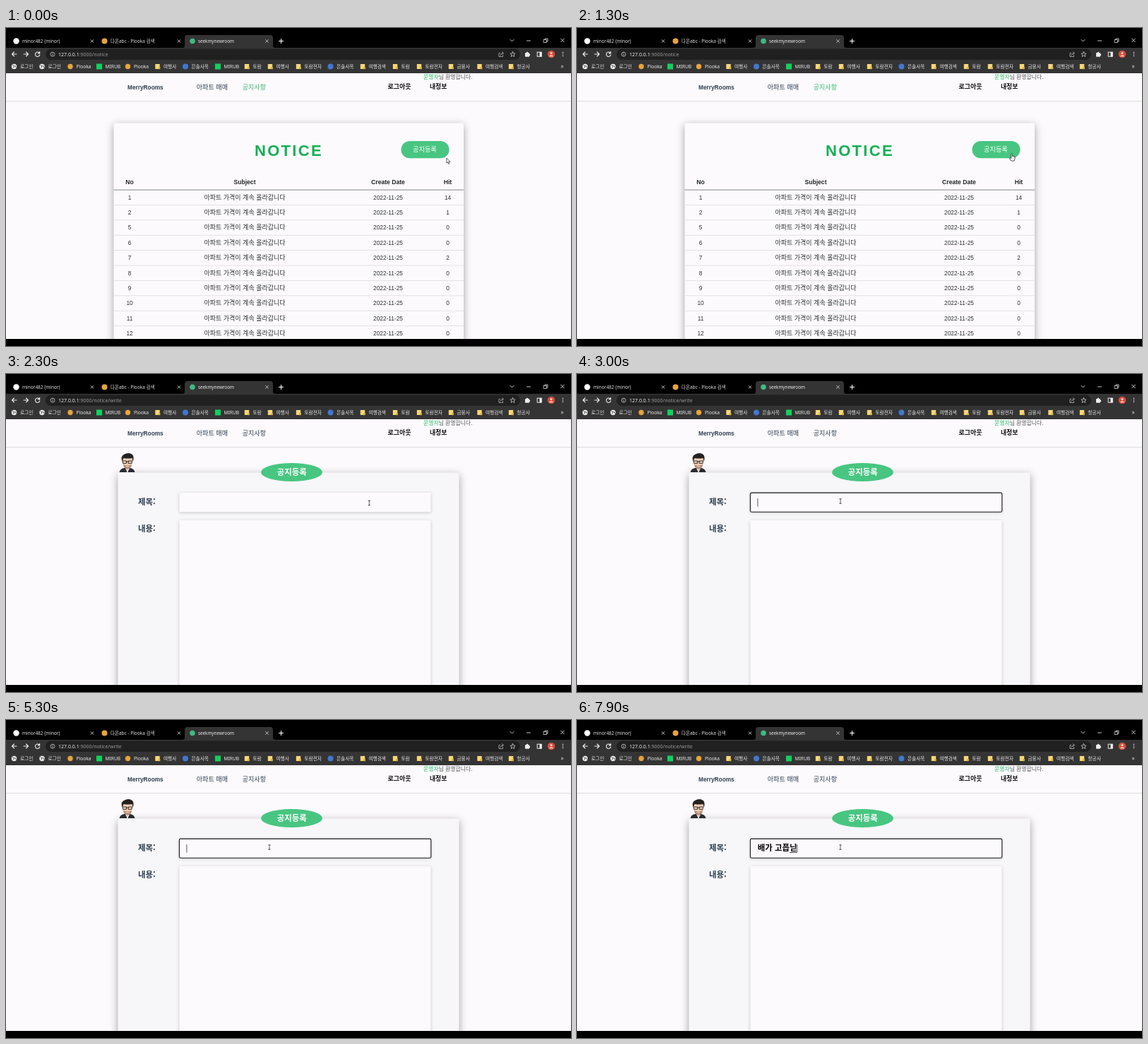
Recreate the animation shown at these times as an HTML page. Size 800 px wide and 450 px high, loop 8000 ms.

```html
<!DOCTYPE html>
<html lang="ko">
<head>
<meta charset="utf-8">
<title>Notice board</title>
<style>
html, body { margin: 0; width: 100%; height: 100%; overflow: hidden; background: #000; }
svg { display: block; width: 100%; height: 100%; }
text { font-family: "Liberation Sans", "Noto Sans CJK KR", "Noto Sans CJK", sans-serif; white-space: pre; }
.ui { font-family: "Noto Sans", "Noto Sans CJK KR", "Noto Sans CJK", sans-serif; }
.ko { font-family: "Noto Sans CJK KR", "Noto Sans CJK", sans-serif; }
.b { font-weight: 700; }
.m { font-weight: 500; }
.mid { text-anchor: middle; }
.card { filter: drop-shadow(0 3px 6px rgba(0,0,0,.36)); }
.field { filter: drop-shadow(0 1px 2px rgba(0,0,0,.2)); }
.line { fill: none; stroke-linecap: round; stroke-linejoin: round; }
</style>
</head>
<body>
<svg id="stage" viewBox="0 0 800 450"></svg>
<script>
const GREEN = '#48c681', INK = '#2c3e50', PAGE = '#fcfafd', BAR = '#343435';

const text = (x, y, size, str, fill, cls = '') =>
  `<text x="${x}" y="${y}" font-size="${size}" fill="${fill}" class="${cls}">${str}</text>`;
const rect = (x, y, w, h, fill, more = '') =>
  `<rect x="${x}" y="${y}" width="${w}" height="${h}" fill="${fill}" ${more}/>`;
const circle = (x, y, r, fill, more = '') =>
  `<circle cx="${x}" cy="${y}" r="${r}" fill="${fill}" ${more}/>`;
const line = (d, stroke = '#ddd', width = 0.9) =>
  `<path class="line" d="${d}" stroke="${stroke}" stroke-width="${width}"/>`;
const cross = (x, y, r) => line(`M${x - r} ${y - r}l${2 * r} ${2 * r}m0 ${-2 * r}l${-2 * r} ${2 * r}`);

const icons = {
  globe: x => circle(x, 54.5, 3.7, '#eee') + line(`M${x - 2} 52.5l2 1.5l-1 2M${x + 1} 53l1.5 2.5`, '#444', 1),
  dot: x => circle(x, 54.5, 3.7, '#e8a33a'),
  square: x => rect(x - 4, 50.5, 8, 8, '#12d05e'),
  ball: x => circle(x, 54.5, 4, '#4377cf'),
  folder: x => `<path d="M${x - 3.2} 51h6.4v7h-6.4z" fill="#f8d775"/><path d="M${x + 1} 55h2.8v3.2h-2.8z" fill="#e3b543"/>`
};
const bookmarks = [
  [11.5, 'globe', '로그인'], [51, 'globe', '로그인'], [91, 'dot', 'Plooka'], [132, 'square', 'MIRUB'],
  [172.5, 'dot', 'Plooka'], [214.5, 'folder', '여행사'], [254, 'ball', '은솔사옥'], [300, 'square', 'MIRUB'],
  [341, 'folder', '토람'], [374, 'folder', '여행사'], [414, 'folder', '토람전자'], [459.5, 'ball', '은솔사옥'],
  [505, 'folder', '여행검색'], [551, 'folder', '토람'], [585, 'folder', '토람전자'], [630, 'folder', '금융사'],
  [670.5, 'folder', '여행검색'], [715, 'folder', '항공사']
];

function browser() {
  const tabs =
    `<path d="M250 28q3 0 3-3V14q0-4 4-4h117q4 0 4 4v11q0 3 3 3z" fill="${BAR}"/>` +
    circle(14.5, 18.5, 4.2, '#fff') + text(23, 21, 6.5, 'minor482 (minor)', '#ddd', 'ui') +
    circle(139.5, 18.5, 4, '#e8a33a') + text(148, 21, 6.5, '다온abc - Plooka 검색', '#ddd', 'ui') +
    circle(264, 18.5, 3.8, '#41b883') + text(272, 21, 6.3, 'seekmynewroom', '#eee', 'ui') +
    cross(122, 18.5, 1.8) + cross(245, 18.5, 1.8) + cross(369.5, 18.5, 1.8) +
    line('M386.5 18.5h6m-3-3v6', '#fff', 1.1) +
    line('M714 16.5l2.5 2.5l2.5-2.5M737.5 18h5') + cross(788, 17.5, 2.4) +
    line('M761.5 16.5h4v4h-4zM763 16.5v-1.5h4v4h-1.5', '#ddd', 0.8);
  const tools =
    rect(56, 29.5, 672, 15.5, '#202021', 'rx="7.7"') +
    line('M15 37H8.5m3-3l-3 3l3 3M25 37h6.5m-3-3l3 3l-3 3', '#eee', 1.1) +
    line('M47 35a3.2 3.2 0 1 0 .8 3M47.7 33.5v2.4h-2.4', '#eee', 1.1) +
    circle(66, 37.2, 3, 'none', 'stroke="#ccc" stroke-width=".8"') + line('M66 37v1.7M66 35.6v.1', '#ccc', 0.8) +
    text(74, 39.8, 7, '127.0.0.1<tspan fill="#9a9a9c">:9000/notice<tspan id="path"></tspan></tspan>', '#eee', 'ui') +
    line('M699.5 35.5H698v5h5.5v-2M700 38.5q.5-3 4-3m-1.5-1.7l1.8 1.7l-1.8 1.7', '#bbb', 0.8) +
    line('M717.5 33.6l1 2.4l2.6.2l-2 1.7l.7 2.6l-2.3-1.4l-2.3 1.4l.7-2.6l-2-1.7l2.6-.2z', '#ccc', 0.8) +
    rect(735, 35, 6, 5.8, '#eee', 'rx=".7"') + circle(738, 35, 1.2, '#eee') + circle(741, 38, 1.2, '#eee') +
    rect(752.2, 34.2, 6, 6, 'none', 'stroke="#eee"') + rect(755.5, 34, 3, 6.5, '#eee') +
    circle(772, 37, 5.3, '#d94b38') + circle(772, 35.6, 1.6, '#f7d4c7') +
    '<path d="M768.7 40.2q3.3-4 6.6 0z" fill="#f7d4c7"/>' +
    [34.5, 37, 39.5].map(y => circle(788.5, y, 0.75, '#eee')).join('');
  const marks = bookmarks.map(([x, icon, label]) =>
    icons[icon](x) + text(x + 8.4, 56.8, 6.7, label, '#e8e8e8', 'ui')).join('');
  return rect(0, 0, 800, 64, '#000') + rect(0, 28, 800, 36, BAR) + tabs + tools + marks +
    text(785.5, 56.5, 8, '»', '#ddd', 'ui');
}

const header = () =>
  text(172, 87, 8.3, 'MerryRooms', INK, 'b') +
  text(269.7, 87, 9.1, '아파트 매매', INK, 'ko m') +
  `<g id="menu">${text(334.8, 87, 9, '공지사항', 'currentColor', 'ko m')}</g>` +
  text(591, 71.6, 7.85, `<tspan fill="#25b864">운영자</tspan>님 환영합니다.`, '#555', 'ko') +
  text(540.5, 85.5, 9, '로그아웃', '#111', 'ko b') +
  text(600, 85.5, 8.8, '내정보', '#111', 'ko b') +
  rect(0, 103.2, 800, 1, '#dadadd');

function noticePage() {
  const columns = [175, 338, 541, 625.5];
  const hits = { 1: 14, 2: 1, 7: 2 };
  const head = ['No', 'Subject', 'Create Date', 'Hit']
    .map((s, i) => text(columns[i], 221, 8.6, s, '#212529', 'b mid')).join('');
  const rows = [1, 2, 5, 6, 7, 8, 9, 10, 11, 12].map((no, i) => {
    const y = 242.5 + 21.4 * i;
    return text(columns[0], y, 8.3, no, '#2b2f33', 'mid') +
      text(columns[1], y, 9, '아파트 가격이 계속 올라갑니다', '#2b2f33', 'ko mid') +
      text(columns[2], y, 8.3, '2022-11-25', '#2b2f33', 'mid') +
      text(columns[3], y, 8.3, hits[no] || 0, '#2b2f33', 'mid') +
      rect(152.5, y + 7.5, 495.5, 0.8, '#dcdde0');
  }).join('');
  return rect(152.5, 134.5, 495.5, 340, PAGE, 'rx="3" class="card"') +
    `<g letter-spacing="2.3">${text(352, 180.5, 22, 'NOTICE', '#14b053', 'b')}</g>` +
    rect(559.5, 160, 68, 24.3, GREEN, 'rx="12.15"') +
    text(576, 175.4, 9.2, '공지등록', '#fff', 'ko') +
    head + rect(152.5, 228.6, 495.5, 1, '#858789') + rows;
}

const avatar = () =>
  '<path d="M160.5 139q1-5 7-6h8q6 1 7 6z" fill="#292b30"/>' +
  '<path d="M169 131h6v3l-3 4l-3-4z" fill="#eec4a9"/>' +
  '<path d="M165 119q7-5 14 0v7q-1 6-7 8q-6-2-7-8z" fill="#f3cdb4"/>' +
  '<path d="M164.3 124q-2-8 2.5-10q7-4 12 0q3 3 .9 10l-1.2-5q-6 1-12 0z" fill="#25211f"/>' +
  '<path d="M166 128q1 6 6 6.500q5-.5 6-6.500q-3 1.500-6 1.500t-6-1.500z" fill="#b08772"/>' +
  line('M165.500 123h5v3.400h-4.500zM173.500 123h5l-.5 3.400h-4.500zM170.500 124h3', '#222', 0.9) +
  line('M170 131h4', '#fff', 0.8) + line('M170.500 135l1.500 4l1.500-4', '#eee', 1);

const writePage = () =>
  rect(158.5, 139.5, 483, 340, '#f7f6f9', 'rx="1" class="card"') + avatar() +
  `<ellipse cx="404.5" cy="139" rx="43.5" ry="13" fill="${GREEN}"/>` +
  text(383.8, 142.8, 11.4, '공지등록', '#fff', 'ko b') +
  text(187, 185, 11.4, '제목:', INK, 'ko b') +
  text(187, 223.3, 11.4, '내용:', INK, 'ko b') +
  rect(245.5, 168, 356, 27.3, PAGE, 'rx="1.5" class="field"') +
  rect(245.5, 207, 356, 260, PAGE, 'rx="1.5" class="field"') +
  rect(245.4, 168.1, 356.400, 27.200, 'none', 'id="focus" rx="1.8" stroke="#18181a" stroke-width="1.1"') +
  `<text id="typed" x="255.8" y="185" font-size="11.4" class="ko b"/>` +
  rect(0, 187, 0, 0.8, '#111', 'id="underline"') +
  rect(0, 176, 0.8, 11.5, '#333', 'id="caret"');

const cursors = () =>
  `<path id="arrow" d="M0 0v7.200l1.700-1.500l1.200 2.700l1.200-.5l-1.200-2.600h2.300z" fill="#fff" stroke="#222" stroke-width=".7"/>` +
  `<path id="hand" d="M-.8.700q.8-1.200 1.600 0v3q2.800.1 3.700 1.200v2.600l-1 3h-4.200l-2.600-3.800q.3-1.300 2.500.3z" fill="#fff" stroke="#222" stroke-width=".8"/>` +
  `<path id="beam" class="line" d="M-1.300-3.200h2.600M0-3.200v6.400M-1.300 3.200h2.600" stroke="#333" stroke-width=".8"/>`;

const stage = document.getElementById('stage');
stage.innerHTML = rect(0, 0, 800, 450, PAGE) +
  `<g id="notice">${noticePage()}</g><g id="write">${writePage()}</g>` +
  header() + browser() + rect(0, 440, 800, 10, '#000') + cursors();

const $ = id => document.getElementById(id);
const show = (id, on) => $(id).setAttribute('visibility', on ? 'visible' : 'hidden');

const OPEN = 1700, FOCUS = 2700;
const pointerPath = [
  [0, 623.8, 184], [900, 615.5, 177.500], [1800, 615.5, 177.500], [2300, 514.3, 182.500], [2600, 373, 180]
];
const typing = [
  [0, ''], [4000, 't'], [4300, ''], [5600, 'ㅂ'], [5700, '배'], [5800, '백'], [6000, '배가'], [6200, '배가 '],
  [6400, '배가 ㄱ'], [6500, '배가 고'], [7000, '배가 곺'], [7200, '배가 고프'], [7400, '배가 고픕'],
  [7700, '배가 고픕ㄴ'], [7800, '배가 고픕니'], [7900, '배가 고픕닏']
];
const caretOff = [[3200, 3800], [4600, 5100]];

function pointerAt(t) {
  const next = pointerPath.findIndex(p => p[0] > t);
  if (next < 0) return pointerPath.at(-1).slice(1);
  const [t0, x0, y0] = pointerPath[next - 1], [t1, x1, y1] = pointerPath[next];
  const k = (t - t0) / (t1 - t0), ease = k * k * (3 - 2 * k);
  return [x0 + (x1 - x0) * ease, y0 + (y1 - y0) * ease];
}

function drawPointer(t) {
  const [x, y] = pointerAt(t);
  const shape = t < OPEN ? (t > 300 ? 'hand' : 'arrow') : (x < 602 ? 'beam' : 'arrow');
  for (const id of ['arrow', 'hand', 'beam']) show(id, id === shape);
  $(shape).setAttribute('transform', `translate(${x} ${y})`);
}

function drawInput(t) {
  const value = typing.findLast(step => step[0] <= t)[1];
  const typed = $('typed');
  typed.textContent = value;
  const end = 255.8 + (value ? typed.getComputedTextLength() : 0);
  const composing = /[^\x00-\x7f]$/.test(value);
  show('underline', composing);
  if (composing) {
    const width = typed.getSubStringLength(value.length - 1, 1);
    $('underline').setAttribute('x', end - width);
    $('underline').setAttribute('width', width);
  }
  show('focus', t >= FOCUS);
  show('caret', t >= FOCUS && !caretOff.some(([from, to]) => t >= from && t < to));
  $('caret').setAttribute('x', end - 0.3);
}

function frame(now) {
  const t = now % 8000, writing = t >= OPEN;
  drawInput(t);
  drawPointer(t);
  $('notice').style.display = writing ? 'none' : '';
  $('write').style.display = writing ? '' : 'none';
  $('menu').style.color = writing ? INK : '#35b86d';
  $('path').textContent = writing ? '/write' : '';
  requestAnimationFrame(frame);
}
requestAnimationFrame(frame);
</script>
</body>
</html>
```
